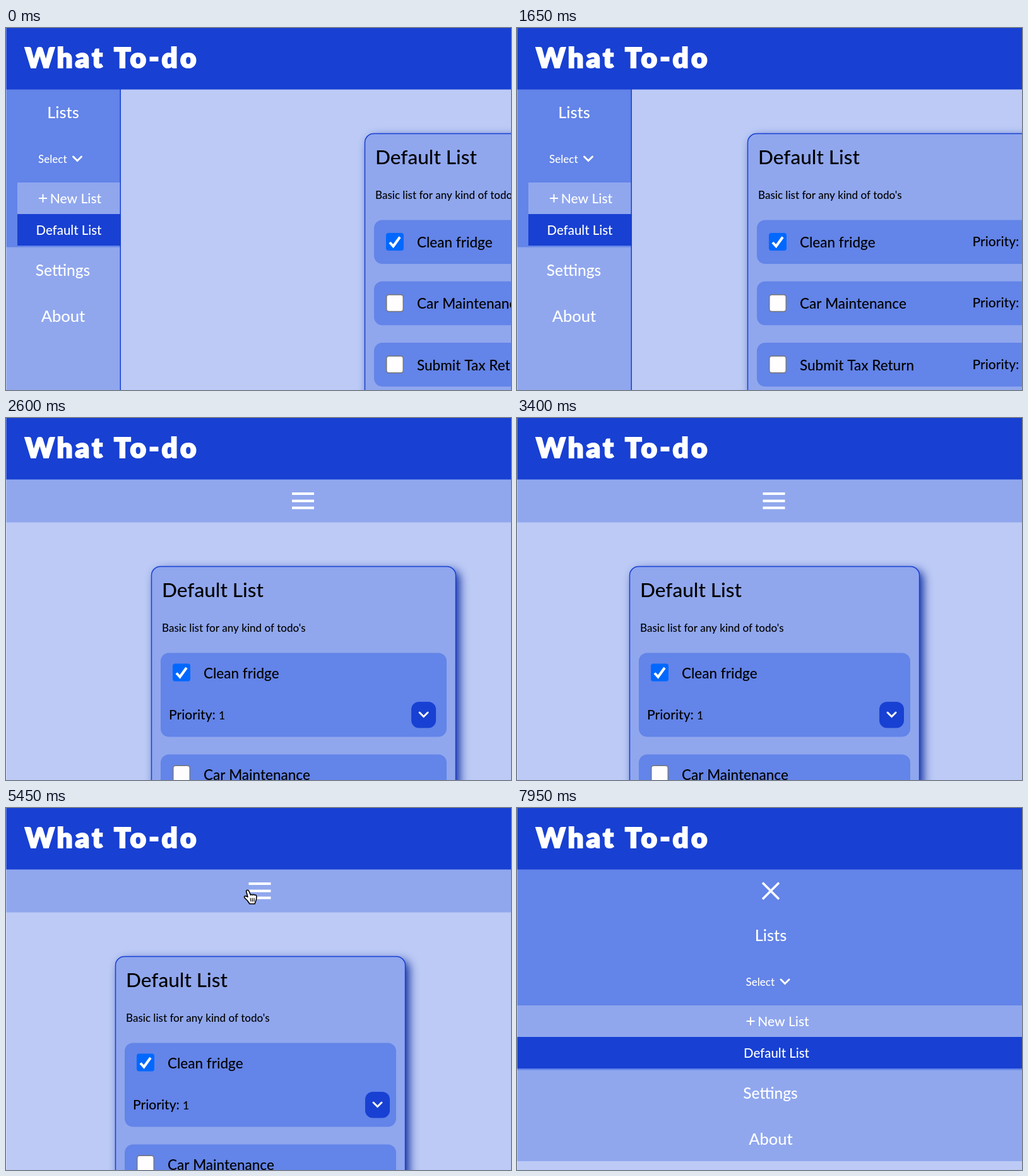
An HTML page with a canvas that plays this animation: 800x574 px, repeating every 8 s.

```html
<!DOCTYPE html>
<html lang="en">
<head>
<meta charset="utf-8">
<title>What To-do</title>
<style>
  html, body { margin: 0; width: 100%; height: 100%; overflow: hidden; background: #bccaf5; }
  canvas { display: block; }
</style>
</head>
<body>
<canvas id="stage" width="800" height="574"></canvas>
<script>
const ctx = document.getElementById('stage').getContext('2d');
const BLUE = '#1840d2', MID = '#6384e8', SOFT = '#90a7ee', PALE = '#bccaf5';
const LOOP = 8000, BREAKPOINT = 1024, MENU_OPENS = 5600;
const TASKS = ['Clean fridge', 'Car Maintenance', 'Submit Tax Return'];

// Browser window width while it is dragged narrower: [seconds, width, px per second]
const WIDTHS = [
  [0, 1934, -250], [0.8, 1634, -490], [1.65, 1122, -350],
  [2.6, 941, -170], [3.4, 814, -60], [3.8, 804, 0]
];

function windowWidth(s) {
  const i = WIDTHS.findIndex(key => key[0] > s);
  if (i < 0) return WIDTHS[WIDTHS.length - 1][1];
  const [t0, a, va] = WIDTHS[i - 1], [t1, b, vb] = WIDTHS[i];
  const d = t1 - t0, u = (s - t0) / d, v = 1 - u;
  return v * v * (1 + 2 * u) * a + u * u * (3 - 2 * u) * b + d * u * v * (v * va - u * vb);
}

function rect(x, y, w, h, color) {
  ctx.fillStyle = color;
  ctx.fillRect(x, y, w, h);
}

function rounded(x, y, w, h, r, fill, stroke) {
  ctx.beginPath();
  ctx.roundRect(x, y, w, h, r);
  ctx.fillStyle = fill;
  ctx.fill();
  if (stroke) {
    ctx.shadowColor = 'transparent';
    ctx.strokeStyle = stroke;
    ctx.lineWidth = 1.5;
    ctx.stroke();
  }
}

function text(str, x, y, size, { color = '#000', weight = 500, align = 'left', spacing = 0, outline = 0 } = {}) {
  ctx.font = `${weight} ${size}px Lato, sans-serif`;
  ctx.letterSpacing = spacing + 'px';
  ctx.textAlign = align;
  ctx.fillStyle = ctx.strokeStyle = color;
  ctx.fillText(str, x, y);
  if (outline) {
    ctx.lineWidth = outline;
    ctx.strokeText(str, x, y);
  }
}

function line(points, width, cap = 'butt') {
  ctx.beginPath();
  points.forEach(([x, y]) => ctx.lineTo(x, y));
  ctx.strokeStyle = '#fff';
  ctx.lineWidth = width;
  ctx.lineCap = cap;
  ctx.stroke();
}

function chevron(x, y) {
  line([[x - 6.5, y - 3.5], [x, y + 3], [x + 6.5, y - 3.5]], 3, 'round');
}

function checkbox(x, y, checked) {
  if (!checked) return rounded(x + 0.75, y + 0.75, 26.5, 26.5, 4, '#fffdfe', '#767676');
  rounded(x, y, 28, 28, 4, '#0068ff');
  line([[x + 6, y + 15], [x + 11.5, y + 21], [x + 22, y + 6.5]], 4);
}

function header() {
  rect(0, 0, 800, 97.5, BLUE);
  text('What To-do', 30, 63, 44, { color: '#fff', weight: 900, spacing: 4, outline: 2 });
}

// Shared by the sidebar and the opened menu; only the band width and offset differ
function menuItems(dx, dy, bandLeft, bandRight) {
  const label = (str, x, y, size, align = 'center') =>
    text(str, x + dx, y + dy, size, { color: '#fff', align });
  rect(0, 97, bandRight, 250.5 + dy, MID);
  rect(bandLeft, 245 + dy, bandRight - bandLeft, 50, SOFT);
  rect(bandLeft, 295 + dy, bandRight - bandLeft, 50, BLUE);
  label('Lists', 90.5, 143, 25.5);
  label('Select', 51, 213.5, 17, 'left');
  chevron(113 + dx, 207.5 + dy);
  line([[52 + dx, 270 + dy], [65 + dx, 270 + dy]], 2);
  line([[58.5 + dx, 263.5 + dy], [58.5 + dx, 276.5 + dy]], 2);
  label('New List', 110.5, 277.5, 21);
  label('Default List', 99.5, 327.5, 20.4);
  label('Settings', 90, 393, 24.5);
  label('About', 90.5, 465.5, 25.5);
}

function card(x, y, w, narrow) {
  ctx.save();
  ctx.shadowColor = '#0c2a9e';
  ctx.shadowBlur = 15;
  ctx.shadowOffsetX = ctx.shadowOffsetY = 6;
  rounded(x + 0.5, y + 0.5, w - 1, 900, 14, SOFT, BLUE);
  ctx.restore();
  text('Default List', x + 17, y + 48.5, 31.6);
  text("Basic list for any kind of todo's", x + 17, y + 104, 17);

  const left = x + 15, right = x + w - 15;
  const height = narrow ? 133 : 69.5, pitch = narrow ? 161 : 97.3;
  const buttonX = right - 49 - 0.3 * (right - left - 430);
  TASKS.forEach((task, i) => {
    const top = y + 137.5 + i * pitch;
    const boxTop = top + (narrow ? 17 : 20.5);
    const baseline = narrow ? top + 105.5 : top + 41.5;
    const priorityX = narrow ? x + 28 : right - 202;
    const buttonTop = narrow ? top + 77.5 : top + 14;
    rounded(left, top, right - left, height, 13, MID);
    checkbox(x + 34, boxTop, i === 0);
    text(task, x + 83, boxTop + 23, 22.5);
    text('Priority:', priorityX, baseline, 21);
    text(String(i + 1), priorityX + 79, baseline, 17.5);
    rounded(buttonX, buttonTop, 39, 41.5, 12, BLUE);
    chevron(buttonX + 19.5, buttonTop + 20.5);
  });
}

function wideLayout(w) {
  card(84.5 + w / 4, 167, w / 2 + 12.5, false);
  rect(0, 97, 181, 477, SOFT);
  menuItems(0, 0, 18, 181);
  rect(180.5, 97, 1.5, 477, BLUE);
}

function narrowLayout(w, open) {
  const mid = w / 2;
  if (open) {
    rect(0, 97, 800, 463, SOFT);
    menuItems(mid - 90.5, 68, 0, 800);
    line([[mid - 13, 118.5], [mid + 13, 144.5]], 3.6);
    line([[mid - 13, 144.5], [mid + 13, 118.5]], 3.6);
    return;
  }
  rect(0, 97, 800, 68.5, SOFT);
  for (const y of [118, 129.5, 140.5]) rect(mid - 17.5, y, 35, 4, '#fff');
  const width = Math.max(460, mid + 12.5);
  card(mid + 1 - width / 2, 235, width, true);
}

const HAND = new Path2D('M4 4Q5 1 8 3L11 10Q12.5 8.5 14 10Q15.5 8.5 17 10Q20 9 20.5 12.5' +
  'L20 17L17.5 24H9.5L6 19L1.5 14.5Q0 11.5 3 11.5L6.5 13Z');
const FINGERS = new Path2D('M10.5 15L11.5 20M13.5 15L14 20M16.5 15V20');
const ARROW = new Path2D('M4 2V19L8 15L11 22L14 21L11 14H17Z');

function cursor(t) {
  if (t < 5150 || t >= 6300) return;
  const arrive = Math.max(0, 1 - (t - 5150) / 250) ** 2;
  const leave = Math.max(0, (t - 6000) / 300) ** 2;
  const x = 376.5 + 423 * arrive - 400 * leave;
  const pointing = x > 370 && x < 420;
  ctx.save();
  ctx.translate(x, 128 + 60 * arrive + 40 * leave);
  ctx.lineWidth = 1.6;
  ctx.lineJoin = 'round';
  ctx.strokeStyle = pointing ? '#000' : '#fff';
  ctx.fillStyle = pointing ? '#fff' : '#000';
  const shape = pointing ? HAND : ARROW;
  ctx.fill(shape);
  ctx.stroke(shape);
  if (pointing) {
    ctx.lineWidth = 1.2;
    ctx.stroke(FINGERS);
  }
  ctx.restore();
}

function draw() {
  const t = Math.floor(performance.now() % LOOP / 50) * 50;
  const w = windowWidth(t / 1000);
  rect(0, 0, 800, 574, PALE);
  if (w > BREAKPOINT) wideLayout(w);
  else narrowLayout(w, t >= MENU_OPENS);
  header();
  rect(0, 0, 1, 574, 'rgba(255, 255, 255, 0.35)'); // light window edge
  cursor(t);
  requestAnimationFrame(draw);
}
draw();
</script>
</body>
</html>
```
